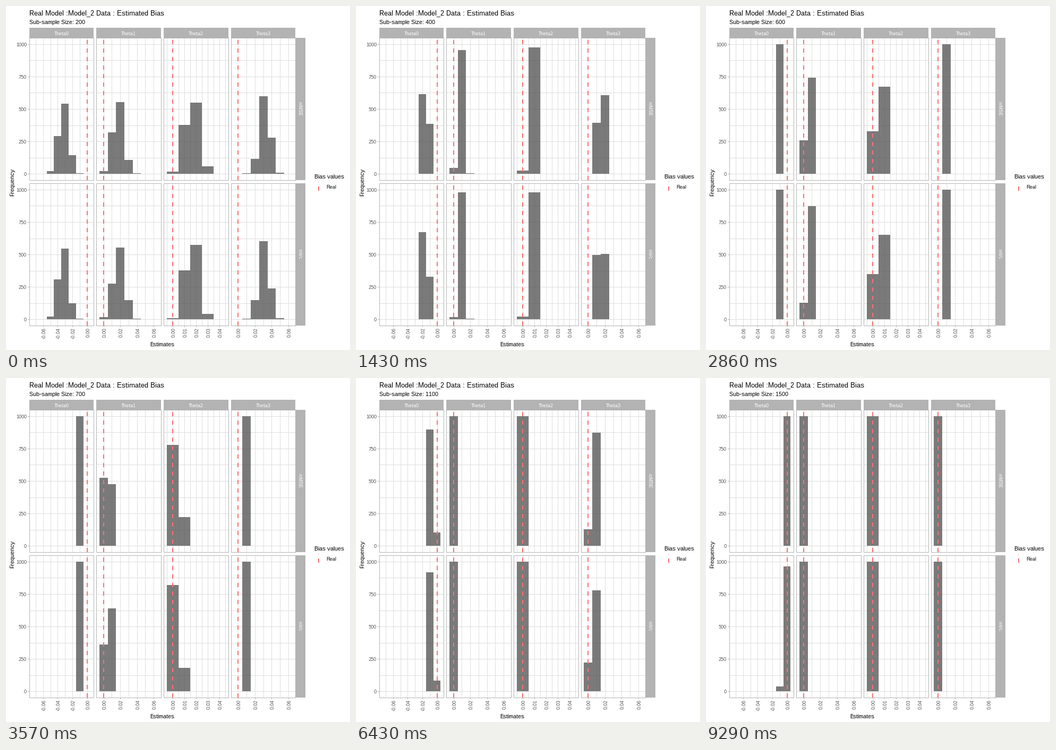
Animation of 648 by 648 pixels, one loop 10 s. Source, as a matplotlib script:

```python
import math
from collections import defaultdict
import matplotlib.pyplot as plt
from matplotlib.animation import FuncAnimation
from matplotlib.collections import PolyCollection

SIZE, STEPS, FRAMES, LOOP = 648, 14, 200, 10000
GRID, EDGE, BAR, RED = "#dedede", "#b3b3b3", "#595959", "#fb7070"
UNIT = 0.244            # pixels per count
HEIGHT = 269

plt.rcParams.update({"font.family": "Liberation Sans", "text.hinting": "native",
                     "text.hinting_factor": 1})
fig = plt.figure(figsize=(SIZE / 72, SIZE / 72), dpi=72, facecolor="white")
ax = fig.add_axes([0, 0, 1, 1])
ax.set_xlim(0, SIZE)
ax.set_ylim(SIZE, 0)
ax.axis("off")

# left, right, pixel of zero, bin width, grid lines per bin, tick bins
FACETS = [
    (44, 166, 153.0, 13.8, 1, range(-6, 1, 2)),
    (170, 293, 184.2, 15.7, 1, range(0, 7, 2)),
    (297, 420, 314.0, 22.0, 2, range(5)),
    (424, 546, 437.3, 15.92, 1, range(0, 7, 2)),
]
# name, panel top, pixel of zero count
ROWS = [("mMSE", 60, 316.6), ("mVc", 334, 590.7)]

# Bias in bins at size 200 (mean, spread) and how fast each shrinks as a power of size.
MODELS = [
    [(-3.18, 0.65, 1.025, 1.6), (1.754, 0.603, 1.011, 1.475),
     (1.643, 0.539, 1.023, 1.785), (3.18, 0.569, 1.034, 1.56)],
    [(-3.217, 0.63, 1.0, 1.375), (1.849, 0.636, 1.0, 1.67),
     (1.641, 0.491, 1.033, 1.753), (3.097, 0.581, 1.044, 1.75)],
]

groups = defaultdict(list)


def rect(x, y, w, h):
    return [(x, y), (x + w, y), (x + w, y + h), (x, y + h)]


def box(x, y, w, h, color, z=1):
    groups[color, z].append(rect(x, y, w, h))


def add_group(verts, color, z, alpha=None):
    group = PolyCollection(verts, facecolors=color, edgecolors="none", linewidths=0,
                           antialiaseds=False, alpha=alpha, zorder=z)
    return ax.add_collection(group, autolim=False)


def label(x, y, text, size, color="black", ha="left", turn=0):
    return ax.text(x, y, text, size=size, color=color, ha=ha, va="baseline",
                   rotation=turn, rotation_mode="anchor", zorder=6)


def draw_panel(facet, top, base):
    left, right, zero, step, fine, _ = facet
    for k in range(9):
        box(left, int(base - k * 30.53), right - left, 1, GRID)
    gap = step / fine
    for k in range(math.ceil((left - zero) / gap), int((right - zero) / gap) + 1):
        box(int(zero + k * gap), top, 1, HEIGHT, GRID)
    for y in range(top + HEIGHT - 9, top, -16):
        box(int(zero) - 1, y, 2, 8, RED, 4)
    for x in (left, right - 1):
        box(x, top, 1, HEIGHT, EDGE, 5)
    for y in (top, top + HEIGHT - 1):
        box(left, y, right - left, 1, EDGE, 5)


def draw_axes():
    for i, (left, right, zero, step, _, ticks) in enumerate(FACETS):
        box(left, 41, right - left - 1, 20, EDGE)
        label((left + right) / 2 - 0.5, 55, f"Theta{i}", 9, "white", "center")
        for k in ticks:
            x = int(zero + k * step)
            box(x, 602, 1, 3, EDGE)
            label(x + 5, 606, f"{k / 100:.2f}", 9, "#4d4d4d", "right", 90)
    for name, top, base in ROWS:
        box(545, top, 19, HEIGHT - 1, EDGE)
        label(550, top + 134, name, 9, "white", "center", 270)
        for k in range(5):
            y = int(base - 61 * k)
            box(41, y, 3, 1, EDGE)
            label(39, y + 4, str(250 * k), 9, "#4d4d4d", "right")


def draw_text():
    label(44, 17, "Real Model :Model_2 Data : Estimated Bias", 13)
    label(294, 641, "Estimates", 11, ha="center")
    label(15, 332, "Frequency", 11, ha="center", turn=90)
    label(581, 325, "Bias values", 11)
    label(603, 344, "Real", 9)
    box(588, 340, 2, 8, RED)
    box(588, 331, 2, 1, "#fdb7b7")
    return label(44, 34, "", 11)


def below(x, mean, spread):
    return 0.5 * (1 + math.erf((x - mean) / spread / math.sqrt(2)))


def histogram(model, size):
    """Yield (bin, count) for 1000 normal estimates at this sample size."""
    mean, spread, fall, narrow = model
    mean *= (200 / size) ** fall
    spread *= (200 / size) ** narrow
    for k in range(-6, 7):
        share = below(k + 0.5, mean, spread) - below(k - 0.5, mean, spread)
        count = round(1000 * share)
        if count > 1:
            yield k, count


def all_bars(size):
    verts = []
    for (_, _, base), models in zip(ROWS, MODELS):
        for facet, model in zip(FACETS, models):
            zero, step = facet[2:4]
            for k, count in histogram(model, size):
                x0 = int(zero + (k - 0.5) * step)
                x1 = int(zero + (k + 0.5) * step)
                h = max(1, round(count * UNIT))
                verts.append(rect(x0, int(base) - h, x1 - x0, h))
    return verts


for _, row_top, row_base in ROWS:
    for spec in FACETS:
        draw_panel(spec, row_top, row_base)
draw_axes()
subtitle = draw_text()
for (tint, level), shapes in groups.items():
    add_group(shapes, tint, level)
bars = add_group([], BAR, 3, 0.8)


def update(n):
    step = (n * STEPS + 12) // FRAMES
    size = 200 + 100 * step
    subtitle.set_text(f"Sub-sample Size: {size}")
    bars.set_verts(all_bars(size))
    return []


anim = FuncAnimation(fig, update, frames=FRAMES, init_func=lambda: update(0),
                     interval=LOOP // FRAMES, repeat=True, repeat_delay=0)
plt.show()
```
